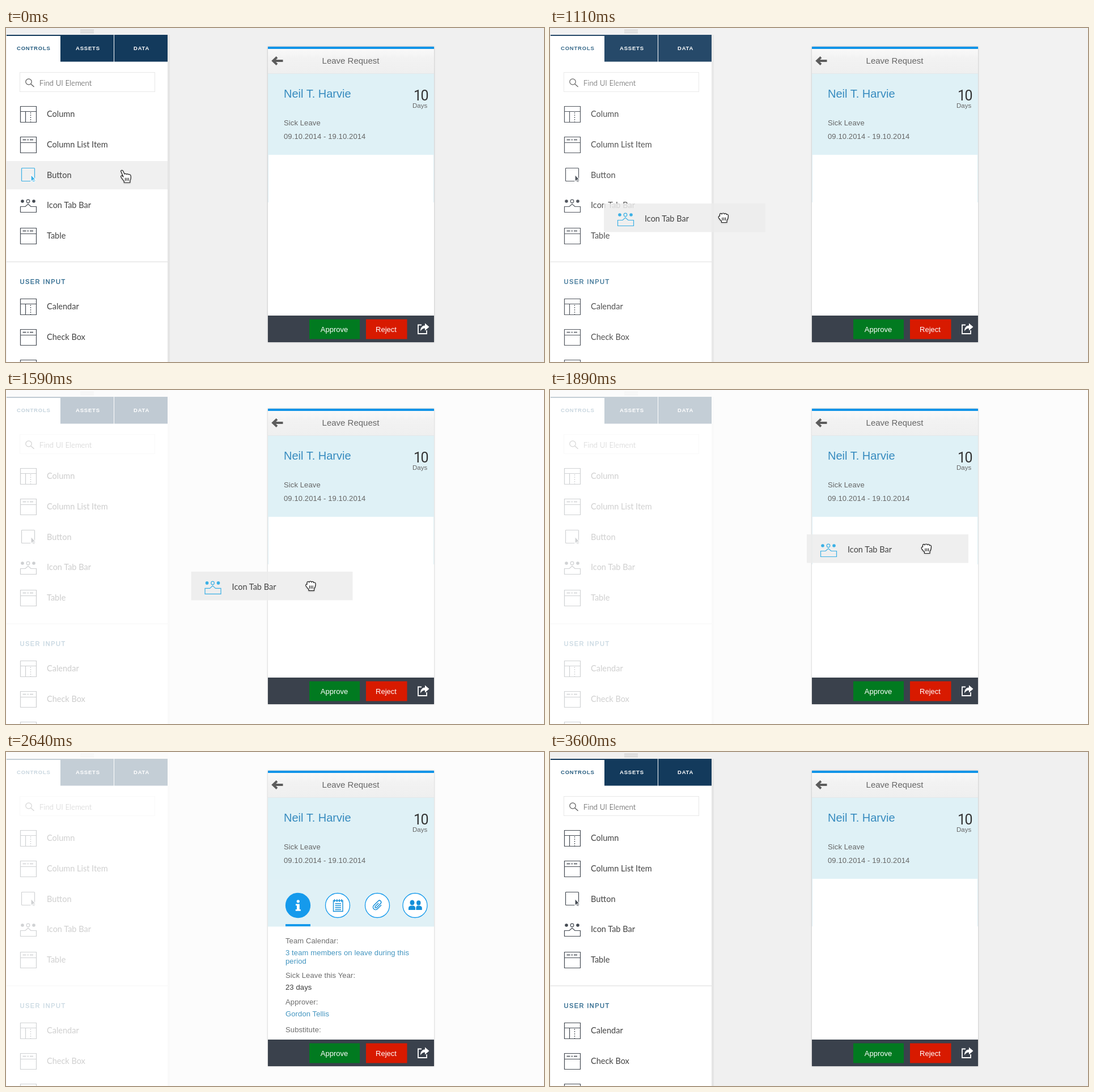
Animation of 949 by 590 pixels, one loop 4500 ms. Source, as an HTML page:

```html
<!DOCTYPE html>
<html lang="en">
<head>
<meta charset="utf-8">
<title>Drag and drop builder</title>
<style>
html, body { margin: 0; width: 100%; height: 100%; overflow: hidden; background: #f0f0f0; }
svg { display: block; }
text { font-family: "Liberation Sans", Arial, sans-serif; font-size: 13px; fill: #666; }
.item { font: 14.5px Lato, sans-serif; fill: #444; }
.search { font: 300 13.3px Lato, sans-serif; fill: #333; }
.tab { font-size: 9.5px; font-weight: bold; letter-spacing: .8px; fill: #fff; }
.body text { letter-spacing: .12px; }
.body .link { fill: #3a90bd; }
.icon { fill: none; stroke: currentColor; color: #444a52; }
.icon.on, .hot .icon { color: #3bb0e5; }
.icon .solid { fill: currentColor; stroke: none; }
.row { fill: none; }
.hot .row { fill: #f0f0f0; }
.hand { fill: #fff; stroke: #222; stroke-width: 1.2; stroke-linejoin: round; stroke-linecap: round;
  filter: drop-shadow(0 1px 1px rgba(0,0,0,.25)); }
.phone { filter: drop-shadow(0 .5px 1.5px rgba(0,0,0,.25)); }
</style>
</head>
<body>
<svg width="949" height="590" viewBox="0 0 949 590">
  <defs>
    <linearGradient id="bar" x2="0" y2="1">
      <stop stop-color="#f9f9f9"/><stop offset=".4" stop-color="#f2f2f2"/><stop offset="1" stop-color="#efefef"/>
    </linearGradient>
  </defs>

  <rect width="949" height="590" fill="#f0f0f0"/>
  <rect x="285" y="12" width="4" height="578" fill="#e5e5e5"/>
  <path d="M131 3.5h24M131 6h24M131 8.5h24" stroke="#c6c6c6"/>
  <rect x="1" y="12" width="284" height="578" fill="#fff"/>
  <path d="M1 12h95v2H1zM96 12h94v47.5H96zM191 12h94v47.5h-94z" fill="#133a5c"/>
  <text class="tab" x="19" y="39" style="fill:#2a5f82">CONTROLS</text>
  <text class="tab" x="123" y="39">ASSETS</text>
  <text class="tab" x="225" y="39">DATA</text>
  <rect x="24.5" y="78.5" width="238" height="34" fill="none" stroke="#e8e8e8"/>
  <g fill="none" stroke="#555" stroke-width="1.2"><circle cx="40" cy="95" r="5.2"/><path d="M44 99l5.5 5"/></g>
  <text class="search" x="59" y="101.5">Find UI Element</text>
  <g id="list"></g>
  <path d="M1 413h284" stroke="#e6e6e6" stroke-width="1.5"/>
  <text x="24.5" y="452" style="font-size:11px;letter-spacing:1.45px;fill:#1f5f86;stroke:#1f5f86;stroke-width:.3">USER INPUT</text>
  <rect id="veil" width="285" height="590" fill="#fff"/>
  <rect id="wash" x="285" width="664" height="590" fill="#fff"/>

  <g class="phone">
    <rect x="462" y="33" width="293" height="522" fill="#fff"/>
    <rect x="462" y="37" width="293" height="44" fill="url(#bar)"/>
    <rect x="462" y="33" width="293" height="4" fill="#0d94e8"/>
    <rect x="462" y="81" width="293" height="143" fill="#dff1f6"/>
    <path d="M462 224h1v84h-1zM754 224h1v84h-1z" fill="#dff1f6"/>
    <path d="M462 80.5h293" stroke="#e4e8e9"/>
  </g>
  <path d="M471 58h17.5M478 51.5L471 58l7 6.5" fill="none" stroke="#5c5c5c" stroke-width="3.8"/>
  <text x="608" y="63" text-anchor="middle" style="font-size:15px">Leave Request</text>
  <g class="body">
    <text x="490" y="122.5" style="font-size:20px;letter-spacing:0;fill:#368bbf">Neil T. Harvie</text>
    <text x="719" y="128" style="font:25px Roboto,sans-serif;letter-spacing:-1.6px;fill:#333">10</text>
    <text x="717" y="141" style="font-size:11.5px;letter-spacing:0">Days</text>
    <text x="490" y="171.5">Sick Leave</text>
    <text x="490" y="195.5">09.10.2014 - 19.10.2014</text>
  </g>

  <g id="content" class="body">
    <rect x="462" y="223" width="293" height="85.5" fill="#dff1f6"/>
    <g fill="#fff" stroke="#0b96ec" stroke-width="1.3">
      <circle cx="515" cy="271" r="21.5" fill="#0b96ec"/>
      <circle cx="585" cy="271" r="21.5"/><circle cx="655" cy="271" r="21.5"/><circle cx="721.5" cy="271" r="21.5"/>
    </g>
    <rect x="493" y="304" width="44" height="4" fill="#0b96ec"/>
    <g fill="#fff"><circle cx="515.3" cy="263.8" r="2.6"/><path d="M511 268.5h6.8v9.5h2v2.8h-9V278h2.2v-6.7h-2z"/></g>
    <g fill="none" stroke="#0b8ad8" stroke-width="1.4">
      <path d="M577.5 262.5h16.5v19h-16.5zM580.5 268h10.5M580.5 271.5h10.5M580.5 275h10.5M580.5 278.5h10.5"/>
      <path d="M579.5 260v5M583.8 260v5M588 260v5M592 260v5"/>
      <path transform="translate(655 271) rotate(45) scale(1.1)" d="M4-5v9a4 4 0 0 1-8 0V-6a2.8 2.8 0 0 1 5.6 0v9.5a1.4 1.4 0 0 1-2.8 0V-4"/>
    </g>
    <g fill="#0b8ad8">
      <ellipse cx="716.5" cy="266" rx="4" ry="4.6"/><path d="M710 279v-3.5q0-3 4-4h5q3 1 3 4v3.5z"/>
      <ellipse cx="727.8" cy="266.5" rx="3.7" ry="4.2"/><path d="M723.3 279v-4q0-2.5 2-3.5h4.5q4 1 4 4v3.5z"/>
    </g>
    <text x="493" y="337.5">Team Calendar:</text>
    <text class="link" x="493" y="358.5">3 team members on leave during this</text>
    <text class="link" x="493" y="373.5">period</text>
    <text x="493" y="398.5">Sick Leave this Year:</text>
    <text x="493" y="419.5" style="fill:#333">23 days</text>
    <text x="493" y="446">Approver:</text>
    <text class="link" x="493" y="466.5">Gordon Tellis</text>
    <text x="493" y="495">Substitute:</text>
  </g>

  <rect x="462" y="508" width="293" height="47" fill="#3a414c"/>
  <rect x="535" y="514.5" width="89" height="35" fill="#017a20"/>
  <rect x="635" y="514.5" width="72.5" height="35" fill="#d81a00"/>
  <g text-anchor="middle">
    <text x="579" y="536.5" style="fill:#fff">Approve</text>
    <text x="670.5" y="536.5" style="fill:#fff">Reject</text>
  </g>
  <path d="M733 524.5h-6v15.5h15v-6" fill="none" stroke="#fff" stroke-width="1.8"/>
  <path d="M731 535.5c0-7 4-10 8-10v-4l7.5 6.5-7.5 6.5v-4c-4 0-6 2-8 5z" fill="#fff"/>

  <rect id="drop" x="462.5" y="224" width="291.5" height="283" fill="none" stroke="#5bc3e2" stroke-width="1.5" stroke-dasharray="5.5 3"/>
  <g id="card"></g>
  <g id="point" class="hand">
    <path d="M-8.5-9.5c1.5-2 3.6-1 4.2.6l2.3 5c1-1.2 3-.9 3.6.4 1-1.1 3-.8 3.6.5 1.6-.9 3.6 0 3.8 2 .6 3.5 0 6.5-1.2 8.5v3.5h-10.5v-2.5c-2-2.5-4-4.5-5.5-7.5-.8-1.8 1.5-3 3-1.2l1.2 1.2z"/>
    <path d="M-.5 3v4.5M2.3 3v4.5M5.1 3v4.5"/>
  </g>
  <g id="grab" class="hand">
    <path d="M-5.5-4c-.6-4 3-4.5 3.7-2 .6-2.6 3.7-2.6 4.2-.2.8-2 3.6-1.6 3.7.8 1.6-1.2 3.4 0 3.4 2 0 4-.5 6-2.5 8.5v3.4h-9.5v-2.4c-2-1.5-3.5-3.5-5-6-.9-1.8.4-3.3 2-2.6z"/>
    <path d="M-1 0v4.5M1.8 0v4.5M4.6 0v4.5"/>
  </g>
</svg>
<script>
const $ = id => document.getElementById(id);

const box = 'M1.5 1.5h28v28h-28z';
const icons = {
  column: `<path d="${box}M1.5 10.5h28M10.5 10.5v19"/><path d="M19.5 12v17" stroke-dasharray="2 2"/>`,
  list: `<path d="${box}M1.5 11.5h28"/><path d="M5.5 6.5h20" stroke-width="1.4" stroke-dasharray="6 2 2.5 2"/>`,
  button: `<rect x="3.5" y="2.5" width="23" height="23" rx="1"/>
    <path class="solid" style="stroke:#fff" d="M20 14v12.5l2.7-2.5 2 4 2-1-2-4h3.8z"/>`,
  tabs: `<circle class="solid" cx="5" cy="8" r="2.8"/><circle cx="15" cy="8" r="2.8"/><circle class="solid" cx="25" cy="8" r="2.8"/>
    <path d="M1.5 17.5h8.5l5-4.5 5 4.5h9.5v10h-28z"/>`
};
const icon = (kind, x, y, cls = '') =>
  `<g class="icon ${cls}" stroke-width="1.2" transform="translate(${x} ${y})">${icons[kind]}</g>`;

const items = [
  ['column', 'Column', 152], ['list', 'Column List Item', 206], ['button', 'Button', 260],
  ['tabs', 'Icon Tab Bar', 313], ['list', 'Table', 367],
  ['column', 'Calendar', 492], ['list', 'Check Box', 546], ['list', '', 600]
];
$('list').innerHTML = items.map(([kind, label, y]) =>
  `<g><rect class="row" x="1" y="${y - 25}" width="284" height="50"/>${icon(kind, 24, y - 15)}
   <text class="item" x="72" y="${y + 5}">${label}</text></g>`).join('');
$('card').innerHTML = `<rect width="285" height="50.5" fill="#ededed" opacity=".85"/>${icon('tabs', 23, 12, 'on')}
  <text class="item" x="72" y="32">Icon Tab Bar</text>`;
const rows = $('list').children;

// Monotone cubic through [time, value] keys, held at both ends.
function track(keys, t) {
  const last = keys.length - 1;
  if (t <= keys[0][0]) return keys[0][1];
  if (t >= keys[last][0]) return keys[last][1];
  const slope = i => (keys[i + 1][1] - keys[i][1]) / (keys[i + 1][0] - keys[i][0]);
  const tangent = i => {
    if (i === 0 || i === last) return 0;
    const a = slope(i - 1), b = slope(i);
    return a * b > 0 ? 2 * a * b / (a + b) : 0;
  };
  const i = keys.findIndex(k => k[0] > t) - 1;
  const [t0, v0] = keys[i], [t1, v1] = keys[i + 1];
  const d = t1 - t0, u = (t - t0) / d, w = 1 - u;
  return v0 * w * w * (1 + 2 * u) + v1 * u * u * (3 - 2 * u)
    + d * u * w * (tangent(i) * w - tangent(i + 1) * u);
}

const GRAB = 870, RELEASE = 2220;
const path = [[GRAB, 1, 286], [1110, 95, 310], [1140, 119, 312], [1380, 287, 325],
  [1680, 346, 317], [1890, 453, 255], [2160, 468, 227]];
const pathX = path.map(([t, x]) => [t, x]);
const pathY = path.map(([t, , y]) => [t, y]);
const pointerY = [[600, 262], [810, 311]];
const veil = [[1050, 0], [1110, .08], [1380, .51], [1650, .75], [3300, .75], [3330, .71], [3600, 0]];
const content = [[RELEASE, 0], [2700, 1], [3330, 1], [3600, 0]];
const dashes = [[1980, 0], [2160, 1], [RELEASE, 1], [2580, 0]];
const held = [[RELEASE, 1], [2430, 0]];

const place = (el, x, y) => el.setAttribute('transform', `translate(${x.toFixed(2)} ${y.toFixed(2)})`);
const fade = (el, a) => { el.style.opacity = a; };

function draw(now) {
  const t = Math.floor(now % 4500 / 30) * 30;
  const x = track(pathX, t), y = track(pathY, t), py = track(pointerY, t);
  const dragging = t >= GRAB, grip = dragging ? track(held, t) : 0;
  const haze = track(veil, t);
  rows[2].classList.toggle('hot', !dragging && py < 287);
  rows[3].classList.toggle('hot', !dragging && py >= 287);
  fade($('veil'), haze);
  fade($('wash'), Math.min(.8, haze * 1.35));
  fade($('content'), track(content, t));
  fade($('drop'), track(dashes, t));
  place($('card'), x, y);
  fade($('card'), grip);
  place($('point'), 211, py);
  fade($('point'), dragging ? 0 : 1);
  place($('grab'), x + 210, y + 25);
  fade($('grab'), grip);
  requestAnimationFrame(draw);
}
requestAnimationFrame(draw);
</script>
</body>
</html>
```
